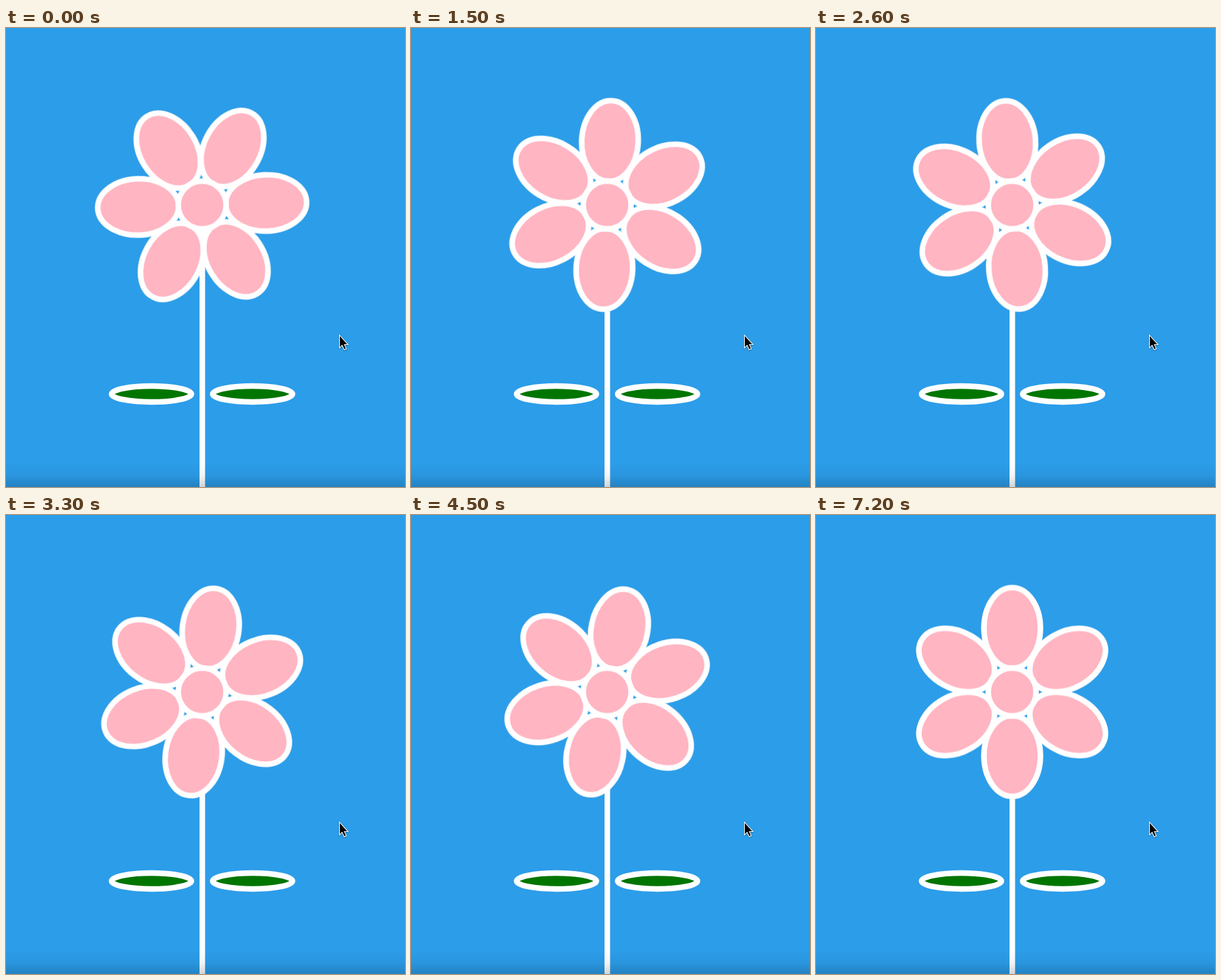
Animation of 600 by 691 pixels, one loop 8 s. Source, as an HTML page:

```html
<!DOCTYPE html>
<html lang="en">
<head>
<meta charset="utf-8">
<title>Spinning flower</title>
<style>
  html, body { margin: 0; width: 100%; height: 100%; overflow: hidden; background: #2c9de9; }
  svg { display: block; width: 600px; height: 691px; }
  .shape { stroke: #fff; stroke-width: 8.4; }
  .pink { fill: #ffb5c2; }
  .leaf { fill: #007500; }
  .cursor {
    stroke: #fff; stroke-width: 2.2; paint-order: stroke;
    filter: drop-shadow(0 1px 1px rgba(0, 0, 0, .35));
  }

  /* One turn takes 3.5 s, drawn ten times a second; at 5.4 s it snaps upright and rests */
  .petals { animation: spin 8s infinite; }
  @keyframes spin {
    0% { transform: rotate(28.2deg); animation-timing-function: steps(54); }
    67.49% { transform: rotate(583.63deg); animation-timing-function: step-end; }
    67.5%, 100% { transform: rotate(0deg); }
  }
</style>
</head>
<body>
<svg viewBox="0 0 600 691">
  <defs>
    <ellipse id="petal" class="shape pink" cy="-96.3" rx="42.5" ry="60.8"/>
    <linearGradient id="shade" x2="0" y2="1">
      <stop offset="0" stop-opacity="0"/>
      <stop offset=".5" stop-opacity=".04"/>
      <stop offset="1" stop-opacity=".17"/>
    </linearGradient>
  </defs>
  <path class="shape" d="M295.2 266.4V700"/>
  <ellipse class="shape leaf" cx="218.8" cy="551" rx="60" ry="12"/>
  <ellipse class="shape leaf" cx="370.8" cy="551" rx="60" ry="12"/>
  <g transform="translate(295 266.4)">
    <g class="petals">
      <use href="#petal"/>
      <use href="#petal" transform="rotate(60)"/>
      <use href="#petal" transform="rotate(120)"/>
      <use href="#petal" transform="rotate(180)"/>
      <use href="#petal" transform="rotate(240)"/>
      <use href="#petal" transform="rotate(300)"/>
    </g>
    <circle class="shape pink" r="36"/>
  </g>
  <rect y="655" width="600" height="36" fill="url(#shade)"/>
  <path class="cursor" d="M502 463.8V480.3L505.7 476.8L508.7 483.6L511 482.6L508.1 476H513Z"/>
</svg>
</body>
</html>
```
